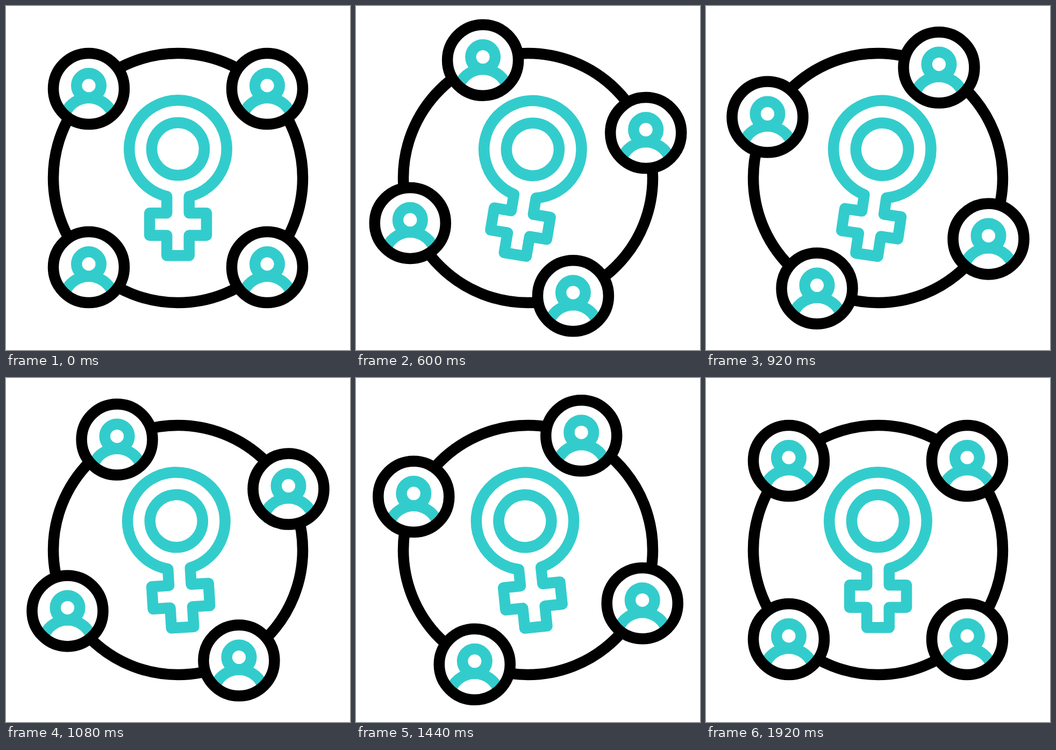
Animation, 640 px wide and 640 px high, one loop 2 s. Source, as an HTML page:

```html
<!DOCTYPE html>
<html>
<head>
<meta charset="utf-8">
<style>
html, body { margin: 0; width: 100%; height: 100%; overflow: hidden; background: #fff; }
svg { display: block; width: 100vw; height: 100vh; }
</style>
</head>
<body>
<svg viewBox="0 0 640 640" fill="none" stroke="#33cccc" stroke-width="20.5" stroke-linejoin="round">
  <defs>
    <g id="person">
      <circle r="66" fill="#fff" stroke="none"/>
      <circle cy="-6" r="22.8"/>
      <path d="M-43 44.1A47.6 47.6 0 0 1 43 44.1"/>
      <circle r="66" stroke="#000"/>
    </g>
  </defs>
  <circle cx="320" cy="320" r="232" stroke="#000"/>
  <g id="symbol">
    <circle cx="320" cy="266" r="49"/>
    <path d="M299.2 354.3A90.7 90.7 0 1 1 340.8 354.3V385.2H373V426.8H340.8V464.3H299.2V426.8H267.2V385.2H299.2Z"/>
  </g>
  <use class="sat" href="#person"/>
  <use class="sat" href="#person"/>
  <use class="sat" href="#person"/>
  <use class="sat" href="#person"/>
</svg>
<script>
const LOOP = 2000, STEP = 40, EASE = 0.519, ORBIT = 166 * Math.SQRT2;
const symbol = document.getElementById('symbol');
const sats = document.querySelectorAll('.sat');

// cubic-bezier(EASE, 0, 1 - EASE, 1), solved by bisection
function ease(x) {
  if (x <= 0 || x >= 1) return x <= 0 ? 0 : 1;
  let lo = 0, hi = 1, s;
  for (let i = 0; i < 30; i++) {
    s = (lo + hi) / 2;
    const q = 1 - s;
    if (3 * EASE * s * q * q + 3 * (1 - EASE) * s * s * q + s * s * s < x) lo = s;
    else hi = s;
  }
  return s * s * (3 - 2 * s);
}

// Eased value at time t through [time, value] keys
function keyed(t, keys) {
  let v = keys[0][1];
  for (let i = 1; i < keys.length; i++) {
    const [t0, v0] = keys[i - 1], [t1, v1] = keys[i];
    v += (v1 - v0) * ease((t - t0) / (t1 - t0));
  }
  return v;
}

const turn = [[80, 0], [1920, 180]];
const swing = [[188, 0], [784, 11.3], [1228, -7], [1920, 0]];

function draw(now) {
  const t = Math.floor(now % LOOP / STEP) * STEP;
  symbol.setAttribute('transform', `rotate(${keyed(t, swing)} 320 320)`);
  const angle = keyed(t, turn);
  sats.forEach((sat, i) => {
    const a = (angle - 45 + 90 * i) * Math.PI / 180;
    sat.setAttribute('transform', `translate(${320 + ORBIT * Math.cos(a)} ${320 + ORBIT * Math.sin(a)})`);
  });
}

let start;
function tick(now) {
  start ??= now;
  draw(now - start);
  requestAnimationFrame(tick);
}
draw(0);
requestAnimationFrame(tick);
</script>
</body>
</html>
```
